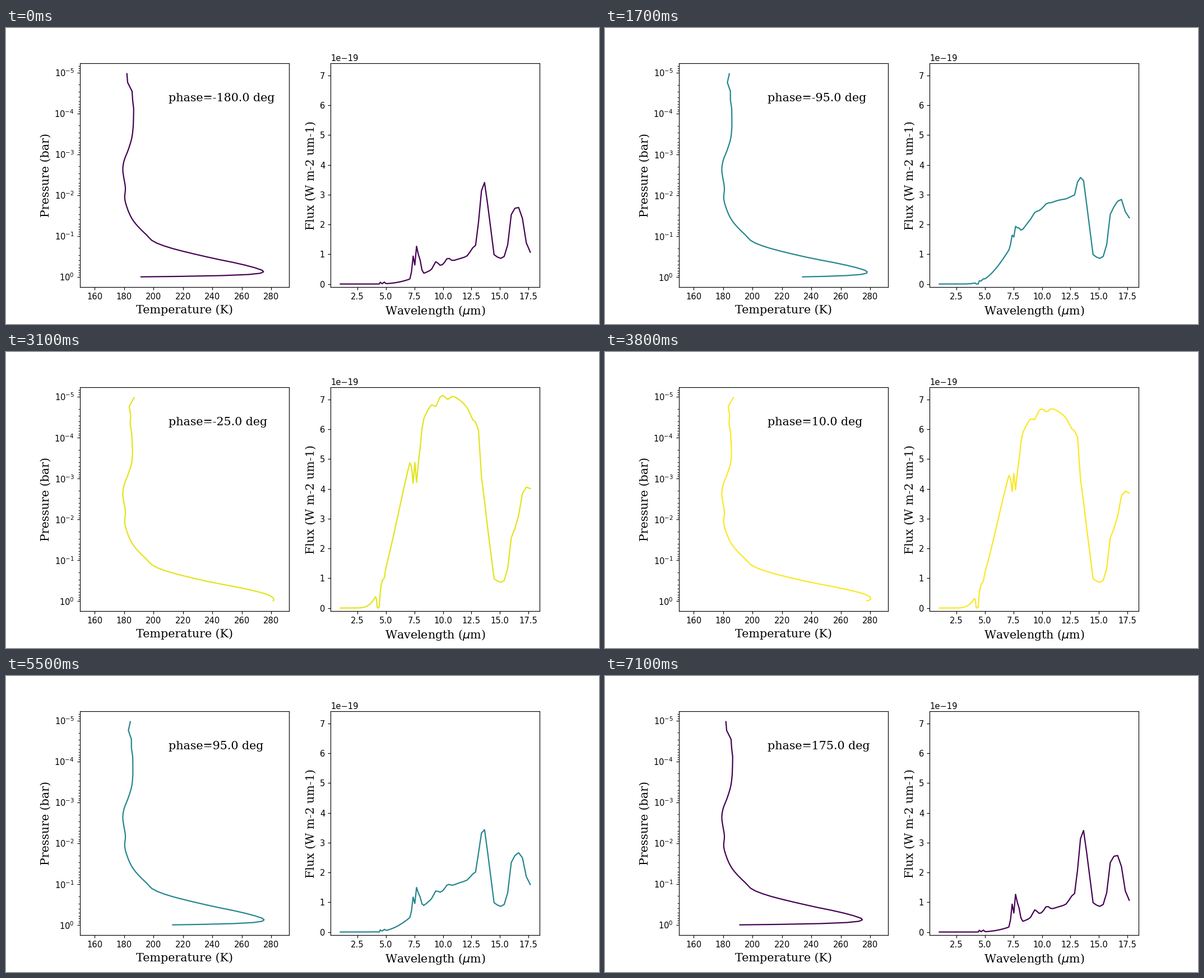
A matplotlib script that plays this animation: 1058x529 px, repeating every 7200 ms.

```python
import numpy as np
import matplotlib.pyplot as plt
from matplotlib.animation import FuncAnimation

FRAMES, INTERVAL = 72, 100
LABEL = dict(family="DejaVu Serif", size=14)
plt.rcParams["font.family"] = "DejaVu Sans"


def smooth(x, keys, values):
    """Cubic Hermite curve through a few key points."""
    keys, values = np.asarray(keys), np.asarray(values)
    slope = np.gradient(values, keys)
    i = np.clip(np.searchsorted(keys, x, side="right") - 1, 0, len(keys) - 2)
    h = keys[i + 1] - keys[i]
    s = (x - keys[i]) / h
    return ((1 + 2 * s) * (1 - s) ** 2 * values[i] + s * (1 - s) ** 2 * h * slope[i]
            + s * s * (3 - 2 * s) * values[i + 1] + s * s * (s - 1) * h * slope[i + 1])


def lobe(phase, center):
    """1 at the center phase, 0 on the opposite side."""
    return (1 + np.cos(np.radians(phase - center))) / 2


def sigmoid(x):
    return 1 / (1 + np.exp(-x))


# --- Temperature profile ---
TOP = -4.971
upper_log_p = np.linspace(TOP, TOP + 6 * 0.215, 7)
upper_night = np.array([181.8, 182.3, 185.3, 185.7, 186.4, 186.3, 186.1])
upper_day = np.array([186.9, 183.4, 184.3, 183.9, 185.0, 185.3, 185.6])
lower_log_p = [-3.38, -3.116, -2.815, -2.62, -2.445, -2.158, -1.925, -1.692, -1.363, -1.007,
               -.856, -.719, -.582, -.459, -.336, -.226, -.158, -.105, .003]
lower_temp = [185.0, 182.8, 179.7, 179.0, 179.6, 180.8, 180.3, 181.9, 186.3, 195.6,
              200.2, 210.1, 224.6, 239.8, 257.8, 271.5, 277.8, 280.5, 283.0]


def profile(phase, warmth, surface_temp):
    surface = 0.003 - 0.012 * warmth
    log_p = np.concatenate([upper_log_p, np.linspace(-3.5, -0.22, 50),
                            surface - 0.161 * np.linspace(1, 0, 7) ** 1.5])
    upper = upper_night + lobe(phase, 0) * (upper_day - upper_night)
    temp = smooth(log_p, np.append(upper_log_p, lower_log_p), np.append(upper, lower_temp))
    # Deep layers cool on the night side, and the ground chills the air just above it
    temp -= 4 * (1 - lobe(phase, -40)) * np.clip((log_p + 0.5) / 0.3, 0, 1)
    temp += (surface_temp - temp[-1]) * np.exp((log_p - surface) / 0.031)
    return temp, log_p


# --- Emission spectrum ---
wave = 1.02 ** np.arange(146)

# Weak gas lines: center, width, strength
weak = sum(strength * np.exp(-0.5 * ((wave - center) / width) ** 2)
           for center, width, strength in [
               (4.52, .05, .35), (4.84, .07, .20), (7.38, .09, .36), (7.70, .10, .43),
               (7.95, .13, .22), (9.38, .18, .07), (10.42, .20, .05), (12.65, .25, .08)])
# Broad opaque band around 15 um, glowing with the air's own temperature
opaque = sigmoid((wave - 13.25) / 0.12) * sigmoid((16.98 - wave) / 0.2)
glow = np.interp(wave, [13.1, 13.4, 13.65, 14.5, 15.07, 15.4, 15.68, 16.0, 16.64, 17.0],
                 [5.2, 3.75, 3.5, .95, .86, .93, 1.31, 2.35, 2.85, 3.4])
notch = 1 - np.exp(-((wave - 4.32) / 0.15) ** 6)


def planck(temp):
    return 1.184e8 / wave ** 5 / np.expm1(14388 / (wave * temp))


def spectrum(surface_temp):
    clear = (1 - weak) * planck(surface_temp) + weak * planck(250)
    return notch * ((1 - opaque) * clear + opaque * glow)


# --- Figure ---
fig, (ax_temp, ax_flux) = plt.subplots(1, 2, figsize=(10, 5), dpi=105.8)
fig.subplots_adjust(left=0.125, right=0.9, bottom=0.125, top=0.88, wspace=0.2)

ax_temp.set_yscale("log")
ax_temp.set_xlim(150, 292)
ax_temp.set_xlabel("Temperature (K)", **LABEL)
ax_temp.set_ylabel("Pressure (bar)", **LABEL)
ax_flux.set_xlim(0.167, 18.49)
ax_flux.set_ylim(-0.1e-19, 7.4e-19)
ax_flux.set_xlabel(r"Wavelength ($\mu$m)", **LABEL)
ax_flux.set_ylabel("Flux (W m-2 um-1)", **LABEL)

temp_line, = ax_temp.plot([], [], lw=1.5)
flux_line, = ax_flux.plot([], [], lw=1.5)
phase_text = ax_temp.text(210, 5e-5, "", **LABEL)


def update(frame):
    phase = -180.0 + 5 * frame
    warmth = lobe(phase, -13) ** 1.35
    surface_temp = 191.2 + 91.4 * warmth

    temp, log_p = profile(phase, warmth, surface_temp)
    temp_line.set_data(temp, 10 ** log_p)
    margin = 0.05 * (log_p[-1] - TOP)
    ax_temp.set_ylim(10 ** (log_p[-1] + margin), 10 ** (TOP - margin))

    flux_line.set_data(wave, 1e-19 * spectrum(surface_temp))
    for line in (temp_line, flux_line):
        line.set_color(plt.cm.viridis(lobe(phase, 0)))
    phase_text.set_text(f"phase={phase:.1f} deg")
    return temp_line, flux_line, phase_text


animation = FuncAnimation(fig, update, frames=FRAMES, interval=INTERVAL,
                          repeat=True, repeat_delay=0, blit=False)
plt.show()
```
